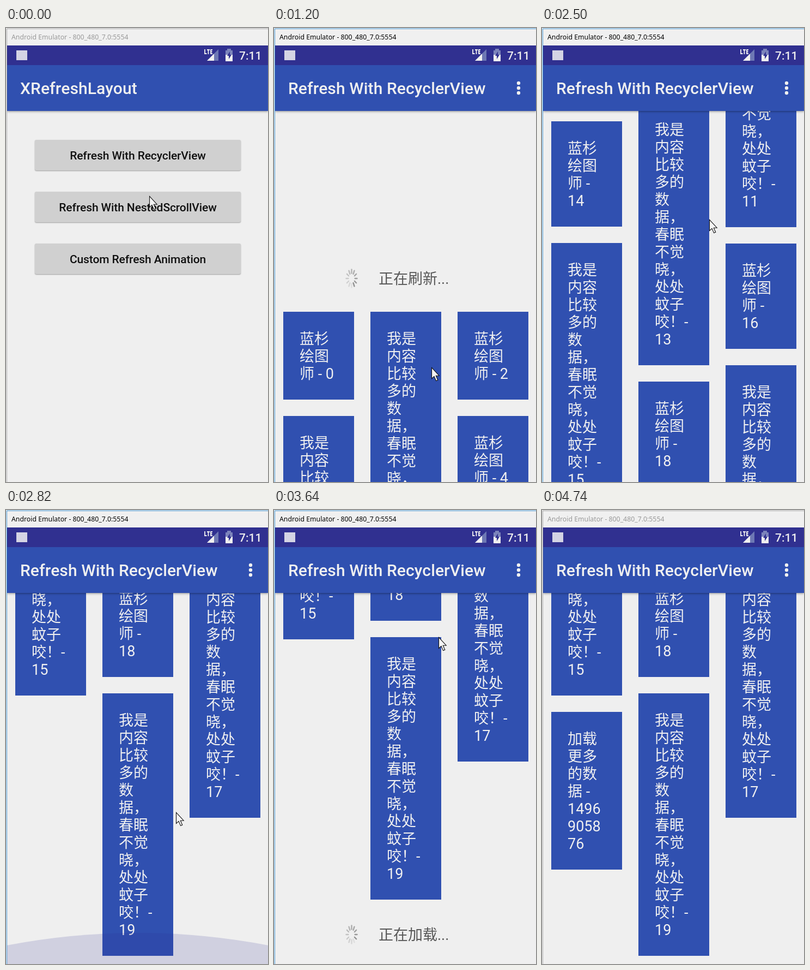
An HTML page for the animation above (4840 ms loop, 481x832 px).

```html
<!DOCTYPE html>
<html lang="zh-CN">
<head>
<meta charset="utf-8">
<title>XRefreshLayout</title>
<style>
html, body { margin: 0; width: 100%; height: 100%; overflow: hidden; background: #f0f0f0; }
#stage { position: absolute; left: 0; top: 0; width: 481px; height: 832px; overflow: hidden;
  background: #f0f0f0; font-family: Roboto, "Noto Sans CJK SC", "Noto Sans CJK", sans-serif; }
#stage div, #stage svg { position: absolute; }
#stage svg { left: 0; top: 0; }
#frame { inset: 1px 0 0 1px; border: solid #4a9ad4; border-width: 1px 0 0 1px; }
#caption { left: 10px; top: 8px; line-height: 18px; color: #000; white-space: nowrap;
  font-family: "Noto Sans", "Open Sans", sans-serif; font-size: 12.3px; }
.blur #caption { color: #999; }
.blur #frame { border-color: #aaa; }
#screen { left: 2px; top: 32px; width: 479px; height: 800px; overflow: hidden; background: #efefef; }
.page { left: 0; top: 36px; width: 479px; height: 764px; background: #efefef; overflow: hidden; }
.bar { left: 0; top: 0; width: 479px; height: 84px; background: #3050b0;
  box-shadow: 0 1px 4px rgba(0,0,0,.42); }
.bar div { left: 24px; top: 25px; font-weight: 500; font-size: 30px; line-height: 35px;
  letter-spacing: .1px; color: #f0f0f0; white-space: nowrap; }
.button { left: 51px; width: 378px; height: 56px; border-radius: 3px; background: #d0d0d0;
  box-shadow: 0 1px 2px rgba(0,0,0,.35); text-align: center; font-weight: 500;
  font-size: 21px; line-height: 58px; letter-spacing: -.1px; color: #101010; }
.card { width: 130px; background: #3050b0; color: #f0f0f0; }
.card div { left: 30px; top: 34px; white-space: pre; }
.card div, .busy div { font-size: 27px; line-height: 32px; }
.busy { left: 0; width: 479px; height: 0; }
.busy div { left: 190px; top: -15px; color: #585858; white-space: nowrap; }
#stage .busy svg { left: 128px; top: -20px; }
#list { left: 0; top: 99px; }
#status { left: 0; top: 0; width: 479px; height: 36px; background: #303090; }
#clock { left: 426px; top: 7px; font-weight: 500; font-size: 21px; line-height: 25px; color: #f0f0f0; }
#cursor { overflow: visible; }
</style>
</head>
<body>
<div id="stage">
  <div id="frame"></div>
  <div id="caption">Android Emulator - 800_480_7.0:5554</div>
  <div id="screen">
    <div class="page" id="home">
      <div class="bar"><div>XRefreshLayout</div></div>
    </div>
    <div class="page" id="feed">
      <div id="list"></div>
      <svg id="glow" width="479" height="764"><path fill="#303090" fill-opacity=".16"/></svg>
      <div class="bar">
        <div>Refresh With RecyclerView</div>
        <svg width="479" height="84" fill="#f0f0f0">
          <circle cx="447" cy="33" r="3.2"/><circle cx="447" cy="42" r="3.2"/><circle cx="447" cy="51" r="3.2"/>
        </svg>
      </div>
    </div>
    <div id="status">
      <svg width="479" height="36">
        <rect x="17" y="9" width="20" height="18" fill="#d4d4e4"/>
        <path d="M363 7v8h3.5M367 8h5M369.5 8v8M377 8h-3v7h3M374 11.5h2.5" fill="none" stroke="#f0f0f0" stroke-width="1.8"/>
        <path d="M388 7v21h-21z" fill="#6d78b4"/>
        <path d="M380 15v13h-13z" fill="#f0f0f0"/>
        <path d="M401 9h3v-3h7v3h3v10h-13z" fill="#7c84bb"/>
        <path d="M401 17h13v12h-13z" fill="#f0f0f0"/>
        <path d="M409 11l-5 8h3v6l5-8h-3z" fill="#303090"/>
      </svg>
      <div id="clock">7:11</div>
    </div>
  </div>
  <svg id="cursor" width="16" height="26">
    <path d="M.5.5V20.5L5 16.4L8.6 24.6L11.8 23.2L8.3 15.2H14.2Z" fill="#f4f4f4" stroke="#111" stroke-width="1.1"/>
  </svg>
</div>
<script>
const LOOP = 4840, GAP = 30;
const $ = id => document.getElementById(id);

function add(parent, cls, text) {
  const el = document.createElement('div');
  if (cls) el.className = cls;
  if (text) el.textContent = text;
  return parent.appendChild(el);
}

const labels = ['Refresh With RecyclerView', 'Refresh With NestedScrollView', 'Custom Refresh Animation'];
const buttons = labels.map((label, i) => {
  const el = add($('home'), 'button', label);
  el.style.top = 137 + 95 * i + 'px';
  return el;
});

// Card texts, one array entry per line
const LONG = '我是 内容 比较 多的 数 据， 春眠 不觉 晓， 处处 蚊子 咬！-'.split(' ');
function itemLines(n) {
  if (n % 2) return [...LONG, n];
  return ['蓝杉', '绘图', ...(n < 10 ? ['师 - ' + n] : ['师 -', n])];
}
const stamped = (verb, end) => [verb, '更多', '的数', '据 -', '1496', '9058', end];

// Staggered grid: each card goes to the shortest column
function pack(items) {
  const group = add($('list')), ends = [0, 0, 0];
  for (const lines of items) {
    const col = ends.indexOf(Math.min(...ends));
    const card = add(group, 'card'), h = 65 + 32 * lines.length;
    card.style.cssText = `left:${15 + 160 * col}px;top:${ends[col]}px;height:${h}px`;
    add(card, '', lines.join('\n'));
    ends[col] += h + GAP;
  }
  return { group, height: Math.max(...ends) - GAP };
}
const base = Array.from({ length: 20 }, (_, n) => itemLines(n));
const fresh = [stamped('刷新', '73'), ...base];
const layouts = [base, fresh, [...fresh, stamped('加载', '76')]].map(pack);

// Busy rows with a twelve-spoke spinner
function busyRow(text) {
  const row = add($('list'), 'busy');
  let spokes = '';
  for (let i = 0; i < 12; i++) {
    const s = Math.sin(i * Math.PI / 6), c = -Math.cos(i * Math.PI / 6);
    spokes += `<line x1="${s * 6.2}" y1="${c * 9.5}" x2="${s * 10}" y2="${c * 16.5}"/>`;
  }
  row.innerHTML = `<svg width="25" height="40" viewBox="-12.5 -20 25 40" stroke-width="2.4" stroke-linecap="round">${spokes}</svg>`;
  add(row, '', text);
  return row;
}
const header = busyRow('正在刷新...'), footer = busyRow('正在加载...');
header.style.top = '-61px';
const spokes = [header, footer].map(r => [...r.querySelectorAll('line')]);

// Progress from a to b, linear, smooth or slowing down
const part = (t, a, b) => Math.min(1, Math.max(0, (t - a) / (b - a)));
const smooth = (t, a, b) => { const p = part(t, a, b); return p * p * (3 - 2 * p); };
const slow = (t, a, b) => 1 - (1 - part(t, a, b)) ** 3;

const END = 817 - 167 - layouts[1].height;

// Pull down, spring back, hide header, fling to the end, pull up, spring back, hide footer
const scroll = t => 353 * smooth(t, 700, 1200) - 258 * slow(t, 1200, 1700)
  - 95 * smooth(t, 1900, 2100) + END * smooth(t, 2100, 2700)
  - 314 * smooth(t, 2820, 3320) + 211 * slow(t, 3320, 3640) + 103 * slow(t, 4140, 4340);

const pointerX = t => 263 + 2 * smooth(t, 0, 300) + 24 * smooth(t, 700, 1200)
  + 4 * smooth(t, 1200, 1900) + 19 * smooth(t, 1900, 2800) - 10 * smooth(t, 2820, 3320);
const pointerY = t => 308 - 57 * smooth(t, 0, 300) + 371 * smooth(t, 700, 1200)
  - 9 * smooth(t, 1200, 1900) - 300 * smooth(t, 2100, 2400)
  + 241 * smooth(t, 2400, 2800) - 321 * smooth(t, 2820, 3320);

const glowRise = t => 57 * Math.sin(Math.PI * part(t, 2620, 3020));

// The picture moves in 100 ms steps, with two short ones
function snap(t) {
  const shift = t < 2820 ? 0 : t < 3640 ? 20 : 40;
  return Math.floor((t - shift) / 100) * 100 + shift;
}

const move = (el, x, y) => el.style.transform = `translate(${Math.round(x)}px,${Math.round(y)}px)`;
const show = (el, on) => el.style.display = on ? '' : 'none';

function draw(now) {
  const t = snap(now % LOOP), focused = t >= 100 && t < 4740;
  $('stage').className = focused ? '' : 'blur';
  buttons[0].style.background = t >= 300 ? '#b9b9b9' : '';

  const opening = t < 600;
  show($('feed'), t >= 500);
  $('feed').style.opacity = opening ? .65 : 1;
  move($('feed'), 0, opening ? 24 : 0);

  const stage = t < 2000 ? 0 : t < 4340 ? 1 : 2;
  layouts.forEach((l, i) => show(l.group, i === stage));
  footer.style.top = layouts[stage].height + 64 + 'px';
  move($('list'), 0, scroll(t));

  const head = Math.floor(8 + (t + LOOP - 1200) / 70);
  for (const set of spokes) set.forEach((line, i) => {
    const v = 145 + ((head - i) % 12 + 12) % 12 * 7;
    line.setAttribute('stroke', `rgb(${v},${v},${v})`);
  });

  const rise = glowRise(t), edge = 764 - rise * .6;
  show($('glow'), rise > .5);
  $('glow').firstElementChild.setAttribute('d',
    `M0 764V${edge}Q239.5 ${edge - rise * .8} 479 ${edge}V764Z`);

  show($('cursor'), t < 4740);
  move($('cursor'), pointerX(t), pointerY(t));
}

const start = performance.now();
function tick() {
  draw(performance.now() - start);
  requestAnimationFrame(tick);
}
tick();
</script>
</body>
</html>
```
